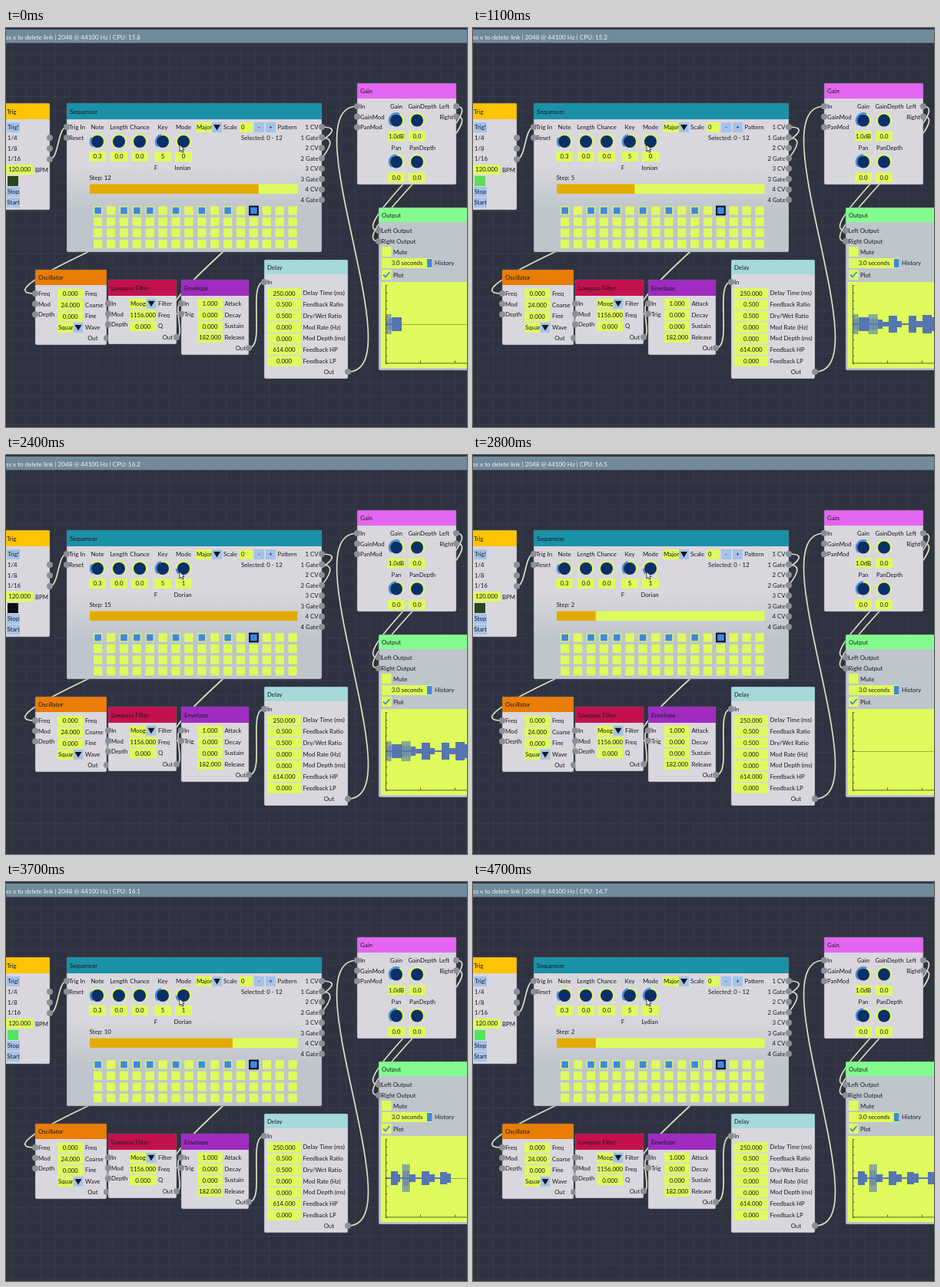
An HTML page with a canvas for the animation above (4.8 s loop, 600x520 px).

```html
<!DOCTYPE html>
<html lang="en">
<head>
<meta charset="utf-8">
<title>Modular synth</title>
<style>
html, body { margin: 0; width: 100%; height: 100%; overflow: hidden; background: #2f3241; }
canvas { display: block; width: 600px; height: 520px; }
</style>
</head>
<body>
<canvas id="stage"></canvas>
<script>
const LOOP = 4800, TICK = 100, STEP = 125;
const canvas = document.getElementById('stage');
const dpr = window.devicePixelRatio || 1;
canvas.width = 600 * dpr;
canvas.height = 520 * dpr;
const ctx = canvas.getContext('2d');
ctx.scale(dpr, dpr);

const FONT = 'Lato, "Open Sans", sans-serif';
const YELLOW = '#dffb5b', BLUE = '#3d88e6', PALE = '#a4c3ea', INK = '#17181d';
const BODY = '#d9d6dd', GREY = '#bec5cc', NAVY = '#0b3068', WIRE = '#dce0bf';

const CPU = [[0, '15.8'], [600, '15.2'], [1300, '16.1'], [1900, '16.2'],
  [2500, '16.5'], [3100, '16.1'], [4300, '14.7']];
const MODES = [[0, 0], [2000, 1], [4100, 2], [4400, 3]];
const MODE_NAMES = ['Ionian', 'Dorian', 'Phrygian', 'Lydian'];
const ACTIVE = [0, 2, 3, 4, 6, 8, 10];

// Bursts: start x, end x, half height, striped
const FIRST = [[494, 502, 13, 1], [502, 515, 9], [515, 527, 13, 1], [527, 533, 6], [533, 541, 3],
  [541, 552, 11], [552, 558, 4], [567, 577, 11], [577, 585, 4], [585, 597, 12], [597, 600, 9]];
const SECOND = [[501, 510, 9], [510, 513, 5], [516, 525, 18, 1], [525, 533, 5],
  [541, 551, 9], [551, 558, 5], [565, 574, 8], [574, 580, 6], [592, 600, 8]];

const at = (list, t) => list.filter(e => e[0] <= t).pop()[1];

function rect(x, y, w, h, color) {
  ctx.fillStyle = color;
  ctx.fillRect(x, y, w, h);
}

function text(s, x, y, align = 'left', color = INK, size = 7.8) {
  ctx.font = `${size}px ${FONT}`;
  ctx.textAlign = align;
  ctx.fillStyle = color;
  ctx.fillText(s, x, y);
}

function box(s, x, y, w, h = 13) {
  rect(x, y, w, h, YELLOW);
  text(s, x + w / 2, y + h / 2 + 2.8, 'center');
}

function button(s, x, y, w, h = 13) {
  rect(x, y, w, h, PALE);
  text(s, x + w / 2, y + h / 2 + 2.8, 'center');
}

function combo(s, x, y, w) {
  rect(x, y, w, 13, YELLOW);
  text(s, x + 1, y + 9.3);
  const ax = x + w - 13;
  rect(ax, y, 13, 13, PALE);
  ctx.fillStyle = INK;
  ctx.beginPath();
  ctx.moveTo(ax + 2, y + 3);
  ctx.lineTo(ax + 11, y + 3);
  ctx.lineTo(ax + 6.5, y + 10.5);
  ctx.fill();
}

function panel(title, x, y, w, h, head, color, body = BODY) {
  ctx.save();
  ctx.beginPath();
  ctx.roundRect(x, y, w, h, 2);
  ctx.clip();
  rect(x, y, w, h, body);
  rect(x, y, w, head, color);
  ctx.restore();
  ctx.strokeStyle = 'rgba(100,105,115,.55)';
  ctx.lineWidth = 0.8;
  ctx.beginPath();
  ctx.roundRect(x, y, w, h, 2);
  ctx.stroke();
  text(title, x + 4, y + head / 2 + 3);
}

function pins(x, ...ys) {
  ctx.fillStyle = '#8b9096';
  for (const y of ys) {
    ctx.beginPath();
    ctx.arc(x, y, 4, 0, Math.PI * 2);
    ctx.fill();
  }
}

function link(x1, y1, x2, y2) {
  const k = Math.hypot(x2 - x1, y2 - y1) / 4;
  ctx.strokeStyle = WIRE;
  ctx.lineWidth = 1.7;
  ctx.beginPath();
  ctx.moveTo(x1, y1);
  ctx.bezierCurveTo(x1 + k, y1, x2 - k, y2, x2, y2);
  ctx.stroke();
}

function knob(x, y, value) {
  const a = Math.PI * 0.75, sweep = Math.PI * 1.5;
  const ring = (color, v) => {
    ctx.strokeStyle = color;
    ctx.lineWidth = 2;
    ctx.beginPath();
    ctx.arc(x, y, 9.3, a, a + sweep * v);
    ctx.stroke();
  };
  ring(YELLOW, 1);
  if (value) ring(BLUE, value);
  ctx.fillStyle = NAVY;
  ctx.beginPath();
  ctx.arc(x, y, 8, 0, Math.PI * 2);
  ctx.fill();
}

function backdrop(t) {
  rect(0, 0, 600, 520, '#2f3241');
  ctx.strokeStyle = '#3b3e4c';
  ctx.lineWidth = 0.8;
  ctx.beginPath();
  for (let x = 8; x < 600; x += 18.6) { ctx.moveTo(x, 20); ctx.lineTo(x, 520); }
  for (let y = 34; y < 520; y += 18.6) { ctx.moveTo(0, y); ctx.lineTo(600, y); }
  ctx.stroke();
  rect(0, 2, 600, 17.5, '#718b9c');
  text('ss x to delete link | 2048 @ 44100 Hz | CPU: ' + at(CPU, t), 0, 14.5, 'left', '#f2f5f6', 8.1);
}

function links() {
  link(57, 171, 79, 129);
  link(411, 129, 38, 346);
  link(411, 143, 228, 373);
  link(131, 404, 133, 359);
  link(222, 403, 228, 359);
  link(316, 417, 336, 331);
  link(445, 448, 457, 102);
  link(586, 102, 485, 264);
  link(586, 115, 485, 278);
}

function trig(phase) {
  panel('Trig', -3, 98, 60, 139, 21, '#fdc403');
  button('Trig!', 1, 123, 17);
  ['1/4', '1/8', '1/16'].forEach((s, i) => text(s, 2, 146 + i * 13.6));
  box('120.000', 0, 178, 35.5);
  text('BPM', 38, 187.5);
  const glow = phase < 0.2 ? '#52e65c' : phase < 0.5 ? '#5fdc55'
    : phase > 0.6 && phase < 0.8 ? '#0b0d10' : '#2b451f';
  rect(2, 193, 14, 13, glow);
  button('Stop', 1, 207, 17);
  button('Start', 1, 221, 17);
  pins(57, 143, 157, 171);
}

function sequencer(t, step) {
  const shade = ctx.createLinearGradient(0, 180, 0, 240);
  shade.addColorStop(0, BODY);
  shade.addColorStop(1, GREY);
  panel('Sequencer', 79, 98, 332, 194, 21, '#1b91a8', shade);
  text('Trig In', 82, 132);
  text('Reset', 82, 145.5);

  const mode = at(MODES, t);
  [['Note', 119, '0.3', 0.3], ['Length', 147, '0.0', 0], ['Chance', 174, '0.0', 0],
    ['Key', 204, '5', 0.45], ['Mode', 231, String(mode), mode / 6]].forEach(([s, x, v, a]) => {
    text(s, x, 132, 'center');
    knob(x, 148, a);
    box(v, x - 11, 161, 22);
  });
  text('F', 195, 184.5, 'center');
  text(MODE_NAMES[mode], 230, 184.5, 'center');

  combo('Major', 247, 123, 34);
  text('Scale', 283, 132);
  box('0', 304, 123, 17);
  // Pattern number sits at the left of its field
  rect(304, 123, 17, 13, YELLOW);
  text('0', 306, 132.3);
  button('-', 323, 123, 13);
  button('+', 338, 123, 13);
  text('Pattern', 353.5, 132);
  text('Selected: 0 - 12', 306, 145.5);
  for (let i = 0; i < 8; i++) {
    const y = 129 + i * 13.57;
    text((i >> 1) + 1 + (i % 2 ? ' Gate' : ' CV'), 406.5, y + 3, 'right');
    pins(411, y);
  }
  pins(79, 129, 143);

  text('Step: ' + step, 108.5, 198);
  rect(109, 203.5, 270.5, 12.5, YELLOW);
  rect(109, 203.5, 270.5 * (step + 1) / 16, 12.5, '#e2ab03');
  for (let r = 0; r < 4; r++) {
    for (let c = 0; c < 16; c++) {
      const x = 114 + c * 16.9, y = 232.3 + r * 14.5;
      rect(x, y, 11.3, 11.3, YELLOW);
      if (r) continue;
      if (ACTIVE.includes(c)) rect(x + 1.3, y + 1.3, 8.7, 8.7, BLUE);
      if (c === 12) {
        rect(x - 0.7, y - 0.7, 12.7, 12.7, '#0c0d12');
        rect(x + 1.3, y + 1.3, 8.7, 8.7, BLUE);
      }
    }
  }
}

function inputs(x, y, names) {
  names.forEach((s, i) => {
    text(s, x + 4, y + 3 + i * 13.6);
    pins(x, y + i * 13.6);
  });
}

function fields(x, y, w, rows) {
  rows.forEach(([v, s], i) => {
    const top = y - 6.3 + i * 14.75;
    if (v === 'Squar' || v === 'Moog') combo(v, x, top, w);
    else box(v, x, top, w, 13);
    text(s, x + w + 2.5, top + 9.2);
  });
}

function output(x, y, labelX) {
  text('Out', labelX, y + 3, 'right');
  pins(x, y);
}

function lowerRow() {
  panel('Oscillator', 38, 315, 93, 98, 20, '#ea7d04');
  inputs(38, 346, ['Freq', 'Mod', 'Depth']);
  fields(67, 346, 33.5, [['0.000', 'Freq'], ['24.000', 'Coarse'], ['0.000', 'Fine'], ['Squar', 'Wave']]);
  output(131, 404, 119.5);

  panel('Lowpass Filter', 133, 328, 89, 84, 21, '#c2114d');
  inputs(133, 359, ['In', 'Mod', 'Depth']);
  fields(161, 359, 34.5, [['Moog', 'Filter'], ['1156.000', 'Freq'], ['0.000', 'Q']]);
  output(222, 403, 217);

  panel('Envelope', 228, 328, 88, 98, 21, '#a02bc1');
  inputs(228, 359, ['In', 'Trig']);
  fields(249, 359, 33, [['1.000', 'Attack'], ['0.000', 'Decay'], ['0.000', 'Sustain'], ['182.000', 'Release']]);
  output(316, 417, 312);

  panel('Delay', 336, 302, 109, 155, 19, '#a5dad9');
  inputs(336, 331, ['In']);
  fields(340, 345.5, 44, [['250.000', 'Delay Time (ms)'], ['0.500', 'Feedback Ratio'],
    ['0.500', 'Dry/Wet Ratio'], ['0.000', 'Mod Rate (Hz)'], ['0.000', 'Mod Depth (ms)'],
    ['614.000', 'Feedback HP'], ['0.000', 'Feedback LP']]);
  output(445, 448, 427);
}

function gain() {
  panel('Gain', 457, 72, 129, 132, 20, '#e466f0');
  inputs(457, 102, ['In', 'GainMod', 'PanMod']);
  [['Gain', 508, 105, '1.0dB', 0.6], ['GainDepth', 535, 105, '0.0', 0],
    ['Pan', 508, 159, '0.0', 0.5], ['PanDepth', 535, 159, '0.0', 0]].forEach(([s, x, y, v, a]) => {
    text(s, s.endsWith('Depth') ? x + 7 : x, y, 'center');
    knob(x, y + 15.5, a);
    box(v, x - 11, y + 29.5, 22);
  });
  text('Left', 577, 105, 'right');
  text('Right', 582, 118.5, 'right');
  pins(586, 102, 115.5);
}

function wave(bursts, head) {
  ctx.save();
  ctx.beginPath();
  ctx.rect(494, 331, Math.max(0, head - 494), 112);
  ctx.clip();
  rect(494, 385, 106, 1.8, '#5476b3');
  for (const [a, b, h, striped] of bursts) {
    if (!striped) rect(a, 386 - h, b - a, h * 2, '#5476b3');
    else {
      rect(a, 386 - h * 0.55, b - a, h * 1.1, 'rgba(84,118,179,.45)');
      for (let x = a; x < b; x += 2) rect(x, 386 - h, 1.2, h * 2, '#5476b3');
    }
  }
  ctx.restore();
}

function scope(t) {
  panel('Output', 485, 234, 130, 212, 19, '#82fd8d', GREY);
  text('Left Output', 488.5, 267);
  text('Right Output', 488.5, 280.5);
  pins(485, 264, 278);
  rect(489, 285, 12.5, 13, YELLOW);
  text('Mute', 504, 294.5);
  rect(489, 300, 66, 13, YELLOW);
  text('3.0 seconds', 522, 309.3, 'center');
  rect(548, 301, 6.5, 11, BLUE);
  text('History', 558, 309.3);
  rect(489, 315, 12.5, 13, YELLOW);
  text('Plot', 504, 324.5);
  ctx.strokeStyle = BLUE;
  ctx.lineWidth = 1.8;
  ctx.beginPath();
  ctx.moveTo(491, 321.5);
  ctx.lineTo(494, 324.5);
  ctx.lineTo(499.5, 318);
  ctx.stroke();

  rect(488, 331, 112, 112, YELLOW);
  rect(494, 386, 106, 0.7, 'rgba(60,70,30,.6)');
  const late = t >= 2780;
  wave(late ? SECOND : FIRST, 495 + (late ? t - 2780 : t + 220) * 0.0914);
  rect(494, 335, 0.8, 102, '#3a401f');
  rect(494, 436.5, 106, 0.8, '#3a401f');
  for (let y = 335; y < 437; y += 10.2) rect(494, y, 2.5, 0.7, '#3a401f');
  for (let x = 494; x < 600; x += 45) rect(x, 433.5, 0.8, 3, '#3a401f');
}

function pointer() {
  ctx.beginPath();
  [[226, 152], [226, 161], [228, 159.2], [229.6, 162.3], [231, 161.6], [229.6, 158.6], [232, 158.3]]
    .forEach(p => ctx.lineTo(...p));
  ctx.closePath();
  ctx.fillStyle = '#fff';
  ctx.fill();
  ctx.strokeStyle = '#111';
  ctx.lineWidth = 0.8;
  ctx.stroke();
}

function draw(t) {
  const beat = t / STEP + 0.5;
  backdrop(t);
  links();
  trig(beat % 1);
  sequencer(t, (12 + Math.floor(beat)) % 16);
  lowerRow();
  gain();
  scope(t);
  pointer();
}

const start = performance.now();
function frame() {
  const t = (performance.now() - start) % LOOP;
  draw(Math.floor(t / TICK) * TICK);
  requestAnimationFrame(frame);
}
frame();
</script>
</body>
</html>
```
